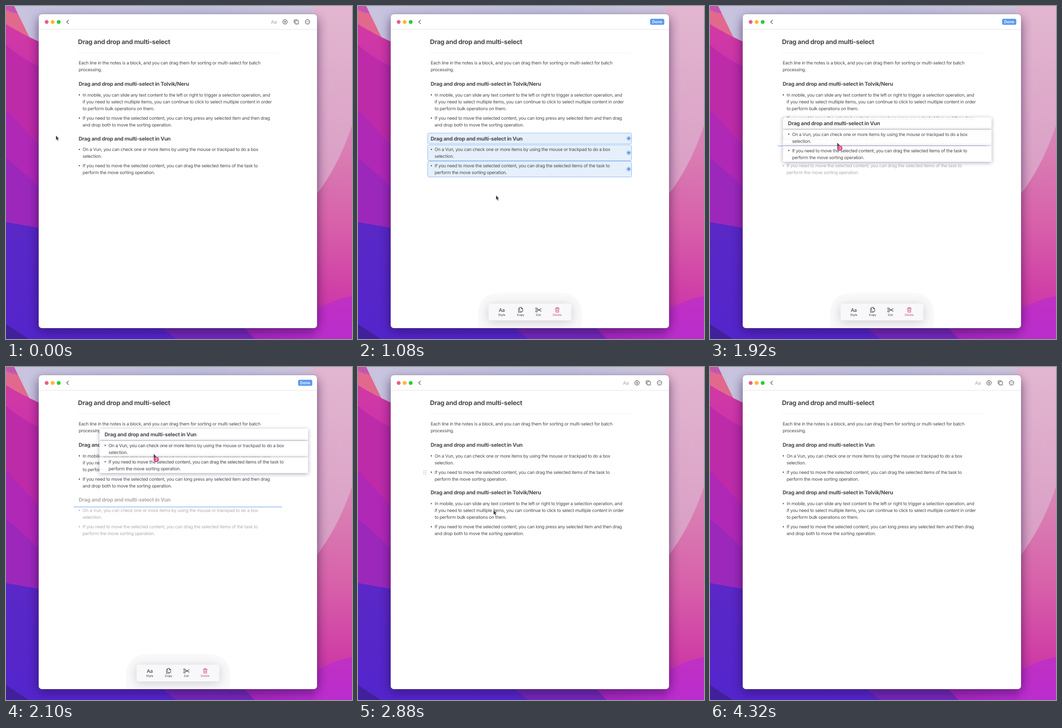
These frames come from a looping animation (762x735 px, 4.38 s). An HTML page:

```html
<!DOCTYPE html>
<html lang="en">
<head>
<meta charset="utf-8">
<title>Drag and drop notes</title>
<style>
  html, body { margin: 0; width: 100%; height: 100%; overflow: hidden; background: #b92cc4; }
  svg { display: block; width: 762px; height: 735px; }
  text { font-family: Inter, "Liberation Sans", sans-serif; font-size: 9.9px; letter-spacing: -.0275em;
         fill: #4a4a4e; text-rendering: geometricPrecision; white-space: pre; }
  .head { font-size: 11.5px; font-weight: 700; letter-spacing: -.023em; }
  .title { font-size: 14px; font-weight: 700; letter-spacing: -.02em; }
  .label { font-size: 6.4px; font-weight: 500; letter-spacing: 0; text-anchor: middle; }
  .line { fill: none; stroke: #505055; stroke-width: 1.1; stroke-linecap: round; stroke-linejoin: round; }
  .pink { stroke: #d9578f; }
  text.pink { fill: #d9578f; stroke: none; }
  .row { fill: #e5f0fb; stroke: #90b7f0; }
  .ghost { fill: #fff; opacity: .92; filter: drop-shadow(0 2px 5px rgba(50, 35, 80, .42)); }
</style>
</head>
<body>
<svg viewBox="0 0 762 735" xmlns="http://www.w3.org/2000/svg">
  <defs>
    <linearGradient id="top">
      <stop offset="0" stop-color="#c9c3de"/><stop offset=".55" stop-color="#bfbfdc"/>
      <stop offset=".85" stop-color="#ccc4dc"/><stop offset="1" stop-color="#e0b4cf"/>
    </linearGradient>
    <linearGradient id="left" x2="0" y2="1">
      <stop offset="0" stop-color="#d13aa4"/><stop offset=".4" stop-color="#c92fae"/>
      <stop offset="1" stop-color="#b42ab4"/>
    </linearGradient>
    <linearGradient id="blue" x2="0" y2="1">
      <stop offset="0" stop-color="#5a28c6"/><stop offset="1" stop-color="#5425cc"/>
    </linearGradient>
    <linearGradient id="haze" x2="0" y2="1">
      <stop offset="0" stop-color="#e2b6d0"/><stop offset="1" stop-color="#d99cc4"/>
    </linearGradient>
    <linearGradient id="right" x2="0" y2="1">
      <stop offset="0" stop-color="#d987b6"/><stop offset=".45" stop-color="#d862aa"/>
      <stop offset=".8" stop-color="#cf3da6"/><stop offset="1" stop-color="#bb2fca"/>
    </linearGradient>
    <linearGradient id="floor">
      <stop offset="0" stop-color="#a326bd"/><stop offset="1" stop-color="#bc2dd2"/>
    </linearGradient>
    <filter id="soft" x="-20%" y="-60%" width="140%" height="220%"><feGaussianBlur stdDeviation="11"/></filter>
    <clipPath id="pane"><rect x="72" y="18" width="613" height="693" rx="7"/></clipPath>
  </defs>

  <g id="wallpaper">
    <path fill="url(#top)" d="M0 0H762V300H0Z"/>
    <path fill="#e0698d" d="M0 0H18L53 72L0 45Z"/>
    <path fill="#c256ae" d="M0 0H18L26 17Q8 14 0 8Z"/>
    <path fill="url(#left)" d="M0 40Q35 62 80 82V420H0Z"/>
    <path fill="#bd2ba9" d="M0 86Q36 118 80 136V320L0 232Z"/>
    <path fill="#b028b6" d="M0 230Q40 268 80 318V500H0Z"/>
    <path fill="#9b28bb" d="M0 335Q34 362 80 408V500H0Z"/>
    <path fill="url(#blue)" d="M0 477L80 491V700H380V735H0Z"/>
    <path fill="#41209b" d="M0 702L50 735H0Z"/>
    <path fill="#7427ba" d="M332 700L374 735H560V700Z"/>
    <path fill="url(#floor)" d="M514 700L548 735H762V700Z"/>
    <path fill="url(#haze)" d="M678 0H762V430H680Z"/>
    <path fill="url(#right)" d="M762 264Q735 345 692 405L680 420V735H762Z"/>
    <path fill="#bb2dce" d="M762 640Q715 650 680 672V735H762Z" opacity=".75"/>
  </g>

  <rect x="70" y="26" width="617" height="692" rx="10" fill="#1c0838" opacity=".5" filter="url(#soft)"/>
  <rect x="71.5" y="17.5" width="614" height="694" rx="7.5" fill="#3a2550" opacity=".35"/>
  <rect x="72" y="18" width="613" height="693" rx="7" fill="#fff"/>
  <path d="M72 51.5H685" stroke="#e3e3e6"/>
  <circle cx="89.5" cy="35.2" r="4.2" fill="#e0638f"/>
  <circle cx="102.7" cy="35.2" r="4.2" fill="#fbb92e"/>
  <circle cx="116" cy="35.2" r="4.2" fill="#2bc840"/>
  <path class="line" d="M137.8 31L133.6 35L137.8 39"/>

  <g id="tools">
    <text x="583.4" y="38.8" style="font-size:10.6px;fill:#a4a4a8">Aa</text>
    <g class="line">
      <circle cx="614.5" cy="35" r="4.9"/><path d="M612.2 35H616.8M614.5 32.7V37.3"/>
      <rect x="636.7" y="32.2" width="7.4" height="7.4" rx="1.2"/>
      <path d="M634.6 37.2V31.3Q634.6 30.2 635.7 30.2H641.6"/>
      <circle cx="664" cy="35" r="4.9"/>
    </g>
    <g fill="#505055">
      <circle cx="661.7" cy="35" r=".75"/><circle cx="664" cy="35" r=".75"/><circle cx="666.3" cy="35" r=".75"/>
    </g>
  </g>
  <g id="done">
    <rect x="643.3" y="28.2" width="31.2" height="13.4" rx="3" fill="#5a98f2"/>
    <text x="658.9" y="38.1" text-anchor="middle" style="font-size:8.8px;font-weight:600;fill:#fff;letter-spacing:0">Done</text>
  </g>

  <text class="title" x="158.6" y="84.3">Drag and drop and multi-select</text>
  <path d="M159 103.7H599" stroke="#f0f0f1"/>
  <g id="intro"></g>
  <g id="rows"></g>
  <g id="first"></g>
  <g id="second"><g id="moved"></g></g>
  <g id="handle" fill="#98989c"></g>

  <g clip-path="url(#pane)">
    <g id="bar">
      <rect x="264.8" y="633.5" width="228" height="110" rx="42" fill="#f9f9fa"/>
      <rect x="286" y="660" width="185" height="38" rx="8" fill="#30303c" opacity=".2" filter="url(#soft)"/>
      <rect x="287.5" y="657" width="182.3" height="37" rx="4" fill="#f8f8fa"/>
      <text x="316.5" y="674.8" text-anchor="middle" style="font-size:10.8px;font-weight:500">Aa</text>
      <g class="line">
        <path d="M355.7 667.4H353.4V676.3H359.6V674.4M355.8 665.4H360L362.8 668.2V674.2H355.8ZM359.8 665.6V668.4H362.6"/>
        <circle cx="392.8" cy="667.8" r="1.8"/><circle cx="392.8" cy="673.8" r="1.8"/>
        <path stroke-width="1.4" d="M394.5 668.6L403.3 673.6M394.5 673L403.3 668"/>
      </g>
      <path class="line pink" d="M434.4 667.4H443.2M437 667.2V665.6H440.6V667.2M435.3 667.6L435.8 676H441.8L442.3 667.6M437.5 669.6V674M440.1 669.6V674"/>
      <text class="label" x="316.5" y="684.3">Style</text>
      <text class="label" x="358" y="684.3">Copy</text>
      <text class="label" x="397.3" y="684.3">Cut</text>
      <text class="label pink" x="438.8" y="684.3">Delete</text>
    </g>
  </g>

  <rect id="lasso" fill="rgb(100,160,235)" fill-opacity=".18" stroke="#82adf0"/>
  <rect id="slot" x="149" width="459" height="1.2" fill="#6fa4ee"/>
  <g id="ghost"></g>
  <g id="cursor">
    <path d="M0 0V9.6L2.2 7.7L3.7 11.2L5.4 10.5L3.9 7.1H6.8Z" fill="#434347" stroke="#fff" stroke-width=".8" paint-order="stroke"/>
    <g id="badge">
      <circle cx="5.6" cy="12.2" r="6" fill="#d6508c"/>
      <text x="5.6" y="15.4" text-anchor="middle" style="font-size:8.8px;fill:#fff">3</text>
    </g>
  </g>
</svg>
<script>
const $ = id => document.getElementById(id);
const LOOP = 4380, STEP = 60, LEAD = 15.2;
const SELECT = 480, RELEASE = 1080, LIFT = 1860, DROP = 2640;
const ANCHOR = [116.5, 293.3], GRAB = [268.3, 335.3];

const lines = (x, y, list) => list.map((s, i) => `<text x="${x}" y="${y + i * LEAD}">${s}</text>`).join('');
const head = (y, s) => `<text class="head" x="160" y="${y}">${s}</text>`;
const item = (y, ...list) => `<circle cx="161.6" cy="${y - 3.6}" r="1.35" fill="#4a4a4e"/>` + lines(168.8, y, list);

$('intro').innerHTML = lines(160, 128.5, [
  'Each line in the notes is a block, and you can drag them for sorting or multi-select for batch',
  'processing.']);
$('first').innerHTML = head(176.2, 'Drag and drop and multi-select in Tolvik/Neru') +
  item(199.8,
    'In mobile, you can slide any text content to the left or right to trigger a selection operation, and',
    'if you need to select multiple items, you can continue to click to select multiple content in order',
    'to perform bulk operations on them.') +
  item(251,
    'If you need to move the selected content, you can long press any selected item and then drag',
    'and drop both to move the sorting operation.');
$('moved').innerHTML = head(296.7, 'Drag and drop and multi-select in Vun') +
  item(320.2,
    'On a Vun, you can check one or more items by using the mouse or trackpad to do a box',
    'selection.') +
  item(356.2,
    'If you need to move the selected content, you can drag the selected items of the task to',
    'perform the move sorting operation.');

// top and height of each selectable row
const ROWS = [[280.5, 23.5], [306.5, 35], [342.5, 35]];
$('rows').innerHTML = ROWS.map(([y, h]) => `<g>
  <rect class="row" x="153.5" y="${y}" width="449" height="${h}" rx="3"/>
  <circle cx="596.2" cy="${y + h / 2}" r="4.2" fill="#fff" stroke="#5394f2"/>
  <circle cx="596.2" cy="${y + h / 2}" r="2.7" fill="#4a8ef2"/></g>`).join('');
const rows = [...$('rows').children];

$('ghost').innerHTML = ROWS.map(([y, h], i) =>
  `<rect class="ghost" x="148.8" y="${y - (i ? 0 : 1)}" width="459.4" height="${h + (i ? 0 : 2)}"/>`
).join('') + '<use href="#moved"/>';

for (let i = 0; i < 6; i++)
  $('handle').innerHTML += `<circle cx="${145.3 + i % 2 * 4}" cy="${228.6 + (i >> 1) * 3.8}" r=".85"/>`;

// time, x, y of the pointer tip
const PATH = [
  [0, 110, 286], [180, 110, 286], [300, 116, 293], [420, 127, 300], [480, 155, 318], [540, 192, 346],
  [660, 275, 403], [780, 300, 416], [960, 304, 418], [1080, 304, 418], [1320, 286, 372], [1560, 270, 338],
  [1740, 268.3, 334.5], [1860, 268.3, 335.3], [1980, 292, 268], [2100, 325.3, 191.8], [2220, 336, 158],
  [2400, 337.5, 144.8], [2640, 337.5, 144.5], [2760, 324, 215], [2880, 298.5, 316], [3000, 288, 380],
  [3180, 270, 450], [3480, 250, 600], [3780, 240, 760]
];
function pointer(t) {
  const i = PATH.findIndex(p => p[0] > t);
  if (i < 0) return PATH.at(-1).slice(1);
  const [a, b] = [PATH[i - 1], PATH[i]], k = (t - a[0]) / (b[0] - a[0]);
  return [1, 2].map(n => a[n] + (b[n] - a[n]) * k);
}

const show = (el, on) => el.style.display = on ? '' : 'none';
const move = (id, x, y) => $(id).setAttribute('transform', `translate(${x} ${y})`);
const clamp = v => Math.max(0, Math.min(1, v));

function draw(t) {
  const [x, y] = pointer(t);
  const lasso = t >= 300 && t < RELEASE, drag = t >= LIFT && t < DROP, done = t >= DROP;
  const selecting = t >= SELECT && t < DROP;

  move('cursor', x, y);
  show($('badge'), drag);
  show($('tools'), !selecting);
  show($('done'), selecting);

  show($('lasso'), lasso);
  if (lasso) {
    const box = { x: ANCHOR[0], y: ANCHOR[1], width: Math.max(0, x - 1.5 - ANCHOR[0]), height: Math.max(0, y - 1 - ANCHOR[1]) };
    for (const k in box) $('lasso').setAttribute(k, box[k]);
  }
  rows.forEach((row, i) => show(row, t >= SELECT && t < LIFT && (t >= RELEASE || y > ROWS[i][0])));

  const rise = 54 * (1 - clamp((t - SELECT) / 300)) ** 2;
  const sink = 80 * clamp((t - DROP) / 180) ** 2;
  show($('bar'), t >= SELECT && t < DROP + 180);
  move('bar', 0, rise + sink);

  show($('ghost'), drag);
  move('ghost', x - GRAB[0], y - GRAB[1]);
  show($('slot'), drag);
  $('slot').setAttribute('y', t < 2220 ? 308.3 : 155);
  $('second').style.opacity = drag ? .45 : 1;

  move('first', 0, done ? 105.3 : 0);
  move('second', 0, done ? -120.4 : 0);
  show($('handle'), t >= 2820 && t < 2940);
}

const start = performance.now();
function tick() {
  const t = (performance.now() - start) % LOOP;
  draw(Math.floor(t / STEP) * STEP);
  requestAnimationFrame(tick);
}
tick();
</script>
</body>
</html>
```
